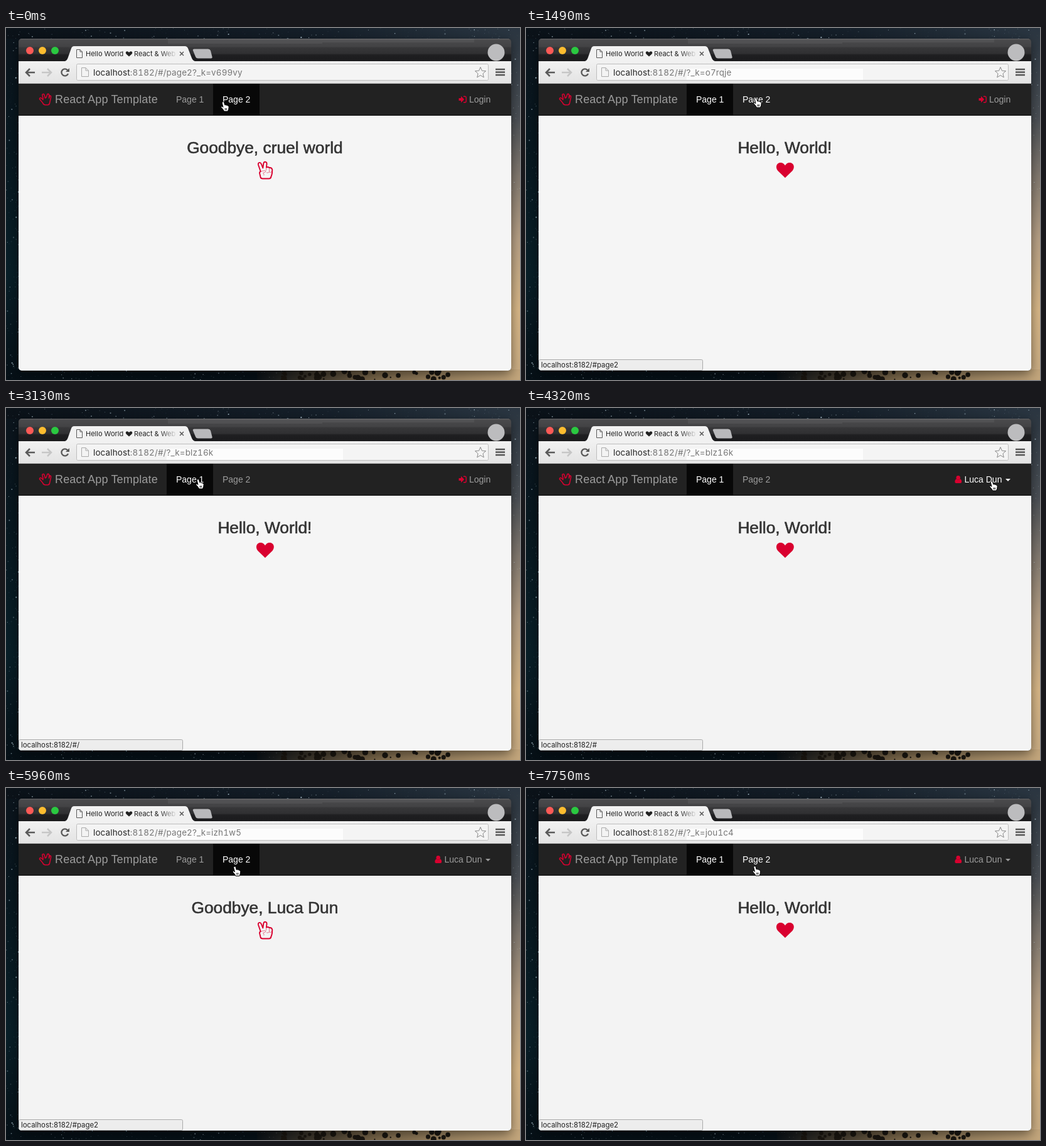
An HTML page with a canvas that plays this animation: 819x562 px, repeating every 8000 ms.

```html
<!DOCTYPE html>
<html lang="en">
<head>
<meta charset="utf-8">
<title>React App Template</title>
<style>
html, body { margin: 0; width: 100%; height: 100%; overflow: hidden; background: #060c12; }
canvas, svg { position: absolute; left: 0; top: 0; display: block; }
text { font-family: "Liberation Sans", Arial, sans-serif; }
.ui { font-family: Inter, "Open Sans", sans-serif; }
.address { font-size: 13.4px; letter-spacing: .17px; font-variant-numeric: tabular-nums; }
.nav { font-size: 14px; fill: #9d9d9d; }
.nav.on { fill: #fff; }
.red { fill: #d9002f; }
.line { fill: none; stroke: #d9002f; stroke-linejoin: round; stroke-linecap: round; }
.icon { fill: none; stroke: #5a5a5a; }
</style>
</head>
<body>
<canvas id="sky" width="819" height="562"></canvas>
<svg width="819" height="562" viewBox="0 0 819 562">
  <defs>
    <clipPath id="frame"><rect x="20" y="17" width="785" height="530" rx="5"/></clipPath>
    <linearGradient id="title" x2="0" y2="1">
      <stop offset="0" stop-color="#626264"/><stop offset=".06" stop-color="#4a4a4c"/>
      <stop offset=".36" stop-color="#424244"/><stop offset=".4" stop-color="#373739"/>
      <stop offset=".66" stop-color="#303032"/><stop offset=".72" stop-color="#1f1f21"/>
      <stop offset="1" stop-color="#1a1a1c"/>
    </linearGradient>
    <linearGradient id="bar" x2="0" y2="1">
      <stop offset="0" stop-color="#f1f1f1"/><stop offset="1" stop-color="#e3e3e3"/>
    </linearGradient>
    <linearGradient id="fade">
      <stop offset="0" stop-color="#f1f1f1" stop-opacity="0"/><stop offset="1" stop-color="#f1f1f1"/>
    </linearGradient>
  </defs>

  <g clip-path="url(#frame)">
    <rect x="20" y="17" width="785" height="36" fill="url(#title)"/>
    <path d="M258 17H746V23H504V25H258Z" fill="#fff" opacity=".05"/>
    <circle cx="38" cy="36" r="6" fill="#fc5a56"/>
    <circle cx="58" cy="36" r="6" fill="#fdbc2f"/>
    <circle cx="78" cy="36" r="6" fill="#2ac940"/>
    <circle cx="781" cy="39" r="13.5" fill="#bcbcbe"/>
    <path d="M300 33.5H322Q325 33.5 326 36L328.5 46Q329 48.500 326.500 48.500H306Q303 48.500 302 46L298 36Q297 33.500 300 33.500Z" fill="#b9b9bb"/>
    <path d="M94 53Q97 52 98.500 48L104 32.500Q105.200 29 108.500 29H285Q288.500 29 290 32.500L296 48Q297.500 52 301 53Z" fill="#f1f1f1"/>
    <path class="icon" d="M112.500 34.500H118L121.500 38V47.500H112.500ZM118 34.500V38H121.500"/>
    <text class="ui" x="127" y="45" font-size="11" fill="#222">Hello World</text>
    <path d="M196 45.500L191.500 41.500Q190 39.500 191.200 38Q193.500 36 196 39Q198.500 36 200.800 38Q202 39.500 200.500 41.500Z" fill="#222"/>
    <text class="ui" x="204" y="45" font-size="11" fill="#222">React &amp; Web</text>
    <rect x="246" y="32" width="27" height="18" fill="url(#fade)"/>
    <path class="icon" d="M277 38L283 44M283 38L277 44" stroke-width="1.500"/>

    <rect x="20" y="53" width="785" height="36" fill="url(#bar)"/>
    <rect x="20" y="88" width="785" height="1" fill="#b4b4b4"/>
    <path class="icon" d="M46 71H32M38 65L32 71L38 77" stroke-width="2.500"/>
    <path class="icon" d="M57 71H71M66 65L72 71L66 77" stroke-width="2.500" style="stroke:#c6c6c6"/>
    <path class="icon" d="M98.300 67.500A5.500 5.500 0 1 0 99 73" stroke-width="2.300"/>
    <path d="M101 64V70H95Z" fill="#5a5a5a"/>
    <rect x="112.500" y="57.500" width="656" height="26" rx="2" fill="#f4f4f4" stroke="#bdbdbd"/>
    <rect id="patch" x="256" y="65" width="281" height="18" fill="#fcfcfc"/>
    <path class="icon" d="M120.500 63.500H127L131.500 68V77.500H120.500ZM127 63.500V68H131.500" style="stroke:#aaa"/>
    <text class="ui address" x="139" y="76" fill="#222">localhost<tspan id="url" fill="#767676"></tspan></text>
    <path id="star" class="icon" style="stroke:#8a8a8a"/>
    <path d="M780 66H795M780 70.500H795M780 75H795" stroke="#555" stroke-width="2.600"/>

    <rect id="page" x="20" y="89" width="785" height="458"/>
    <rect x="20" y="89" width="785" height="50" fill="#222"/>
    <rect id="tab" y="89" width="74" height="50" fill="#080808"/>
    <rect x="20" y="139" width="785" height="1" fill="#080808"/>
    <path class="line" stroke-width="1.500" d="M59 114.500L55.800 111.500Q53.200 111 53.500 113.600L58.500 119.500Q59.500 122.700 62.500 122.700H66.500Q69 122.700 69.500 120L71.600 110.500Q71.800 107.700 70 108L68.500 112L68.700 107Q68 104.300 66 105.500L64 111L62.500 112L61 106.500Q59.500 104 57.800 106.500L59 112.500Z"/>
    <text x="78" y="120" font-size="18" letter-spacing=".17" fill="#9d9d9d">React App Template</text>
    <text class="nav" id="link1" x="271" y="119">Page 1</text>
    <text class="nav" id="link2" x="345" y="119">Page 2</text>
    <g id="login">
      <path class="red" d="M721.500 112H725V108.800L730.200 114L725 119.200V116H721.500Z"/>
      <path class="line" stroke-width="1.400" d="M729.500 109.200H731.500Q733.200 109.200 733.200 111V117Q733.200 118.800 731.500 118.800H729.500"/>
      <text class="nav" x="738" y="119">Login</text>
    </g>
    <g id="user">
      <circle class="red" cx="688.700" cy="111.200" r="3.200"/>
      <path class="red" d="M685.500 113.200Q688.700 116 692 113.200Q694.300 114.500 694.200 118Q694 120 692 120H685.500Q683.400 120 683.300 118Q683.200 114.500 685.500 113.200Z"/>
      <text class="nav" x="698.500" y="119">Luca Dun</text>
      <path id="caret" d="M764 113H772L768 117Z"/>
    </g>

    <text id="head" x="412.400" y="200" font-size="26.300" text-anchor="middle" fill="#333" stroke="#333" stroke-width=".6"></text>
    <path id="heart" class="red" d="M412.900 239.300L401.300 228C396.500 222 399.500 215 405.500 215C409 215 411.300 217 412.900 219.500C414.400 217 416.700 215 420.200 215C426.300 215 429.300 222 424.500 228Z"/>
    <g id="peace" class="line">
      <path stroke-width="1.900" d="M405.700 229L402 218.500Q401.300 215.300 404 214.900Q406 214.800 406.800 217.200L409.300 223.500L410.400 216Q411 213.300 413.500 213.900Q415.900 214.500 415.500 217.300L414.900 222.500Q417.500 221.300 419.500 223Q423.700 222.600 424.300 226.500L424 231.500Q423.500 235 422.500 237Q422 240.500 419 240.500H409Q405.900 240.500 405.500 238L404 231.500Q403.800 229.800 405.700 229Z"/>
      <path stroke-width=".8" opacity=".65" d="M405.700 229L412.500 227.500Q414.500 228 413.500 229.800L409.500 231.500Q411.500 232.500 411 235M414.900 222.500L414.500 227M419.500 223V229.500Q418.500 232 415.500 231M419.500 230Q422.500 232 424 228"/>
    </g>

    <g id="status">
      <rect x="20.500" y="529.500" width="261" height="17" rx="2" fill="#ededed" stroke="#a9a9a9"/>
      <text class="ui" id="hint" x="24" y="542" font-size="11.400" fill="#222"></text>
    </g>
  </g>

  <g id="cursor" stroke-linejoin="round">
    <path id="hand" fill="#fff" stroke="#000" d="M3.200 .9Q5 0 5.600 2L6.700 6Q8 5 9 6.300Q10.300 5.600 11.200 7Q13.200 7 13.200 9L12.700 12.500L11.500 16H5.500L4 13.300L.8 9.600Q.4 7.800 2.200 8L4 9.500L2.300 3Q2 1.400 3.200 .9ZM7.300 11V14M9.300 11V14"/>
    <path id="arrow" fill="#000" stroke="#fff" d="M2 1V14.500L5.200 11.500L7.500 16.500L9.500 15.500L7.300 10.800H11.800Z"/>
  </g>
</svg>
<script>
const $ = id => document.getElementById(id);
const LOOP = 8000, LOGIN_AT = 4320;
const HOME = '#/', PAGE2 = '#page2';

// Each track: [start ms, value], held until the next step.
const urls = [
  [0, 'page2?_k=v699vy'], [890, '?_k=o7rqje'], [2240, 'page2?_k=fvncx7'],
  [3130, '?_k=blz16k'], [5810, 'page2?_k=izh1w5'], [7310, '?_k=jou1c4']
];
const hints = [
  [0, null], [290, HOME], [1340, PAGE2], [2680, HOME], [3430, PAGE2], [3580, null],
  [3870, '#'], [5070, ''], [5360, PAGE2], [7010, HOME], [7750, PAGE2]
];
const moves = [
  [0, [342, 117]], [140, [312, 112]], [290, [288.5, 108]],
  [1040, [291, 109]], [1190, [318, 110]], [1340, [350, 112]], [1490, [362, 111]],
  [2530, [335, 113]], [2680, [302, 113]],
  [3280, [330, 115]], [3430, [420, 118]], [3580, [540, 118]], [3730, [680, 118]], [3870, [738, 116]],
  [4920, [690, 118]], [5070, [560, 123]], [5220, [430, 127]], [5360, [360.5, 124.5]],
  [6860, [335, 125]], [7010, [303, 124.5]], [7600, [330, 125]], [7750, [360.5, 124]]
];
const at = (track, t) => track.findLast(step => step[0] <= t)[1];
const show = (id, on) => $(id).style.display = on ? '' : 'none';

function paintSky() {
  const c = $('sky').getContext('2d');
  let seed = 7;
  const rnd = () => (seed = (seed * 16807) % 2147483647) / 2147483647;
  const fill = (x, y, w, h, dx, dy, stops) => {
    const g = c.createLinearGradient(x, y, x + dx, y + dy);
    stops.forEach(([p, color]) => g.addColorStop(p, color));
    c.fillStyle = g;
    c.fillRect(x, y, w, h);
  };
  fill(0, 0, 819, 562, 0, 562, [[0, '#0b141c'], [.35, '#07171f'], [.7, '#081e27'], [1, '#050f16']]);
  fill(0, 0, 819, 17, 819, 0, [[0, '#0a1118'], [.6, '#141e28'], [1, '#2a3642']]);
  fill(803, 0, 16, 562, 0, 562, [[0, '#2a3540'], [.25, '#4a4f55'], [.42, '#837a70'], [.6, '#b8a186'], [.8, '#d9b888'], [1, '#c9ac84']]);
  fill(400, 545, 419, 17, 419, 0, [[0, '#0a1116'], [.2, '#3a342a'], [.45, '#7a674a'], [1, '#c3a67c']]);
  c.fillStyle = '#1a1610';
  for (let i = 0; i < 45; i++) {
    c.beginPath();
    c.arc(440 + 290 * rnd() ** 1.5, 548 + 14 * rnd(), 1 + 4 * rnd(), 0, 7);
    c.fill();
  }
  c.shadowColor = 'rgba(0,0,0,.5)';
  c.shadowBlur = 18;
  c.shadowOffsetY = 5;
  c.fillStyle = '#222';
  c.beginPath();
  c.roundRect(20, 17, 785, 530, 5);
  c.fill();
  c.shadowColor = 'transparent';
  for (let i = 0; i < 5000; i++) {
    const x = 819 * rnd(), y = 562 * rnd(), s = .6 + 1.3 * rnd() ** 3;
    c.fillStyle = `rgba(190,212,225,${.08 + .75 * rnd() ** 2.5})`;
    if (!(x > 800 && y > 260) && !(x > 440 && y > 545)) c.fillRect(x, y, s, s);
  }
}

function starPath(cx, cy, r) {
  const points = Array.from({ length: 10 }, (_, i) => {
    const a = i * Math.PI / 5 - Math.PI / 2, d = i % 2 ? r * .45 : r;
    return (cx + d * Math.cos(a)).toFixed(1) + ' ' + (cy + d * Math.sin(a)).toFixed(1);
  });
  return 'M' + points.join('L') + 'Z';
}

function render() {
  const t = performance.now() % LOOP;
  const url = at(urls, t), hint = at(hints, t), [x, y] = at(moves, t);
  const second = url.startsWith('page2'), user = t >= LOGIN_AT;
  const over = (from, to) => x + 4 >= from && x + 4 < to;
  const over1 = over(256, 330), over2 = over(330, 404), overUser = over(user ? 668 : 706, 787);

  $('url').textContent = ':8182/#/' + url;
  show('patch', t >= 890);
  $('page').setAttribute('fill', t < 3430 ? '#f5f5f5' : '#f3f3f3');
  $('tab').setAttribute('x', second ? 330 : 256);
  $('link1').classList.toggle('on', !second || over1);
  $('link2').classList.toggle('on', second || over2);
  document.querySelectorAll('#login text, #user text').forEach(e => e.classList.toggle('on', overUser));
  $('caret').setAttribute('fill', overUser ? '#fff' : '#9d9d9d');
  show('login', !user);
  show('user', user);

  $('head').textContent = !second ? 'Hello, World!' : user ? 'Goodbye, Luca Dun' : 'Goodbye, cruel world';
  show('heart', !second);
  show('peace', second);
  show('status', hint !== null);
  $('hint').textContent = hint ? 'localhost:8182/' + hint : '';

  const onLink = over1 || over2 || overUser;
  show('hand', onLink);
  show('arrow', !onLink);
  $('cursor').setAttribute('transform', `translate(${x} ${y})`);
  requestAnimationFrame(render);
}

$('star').setAttribute('d', starPath(756, 71.5, 9));
paintSky();
render();
</script>
</body>
</html>
```
